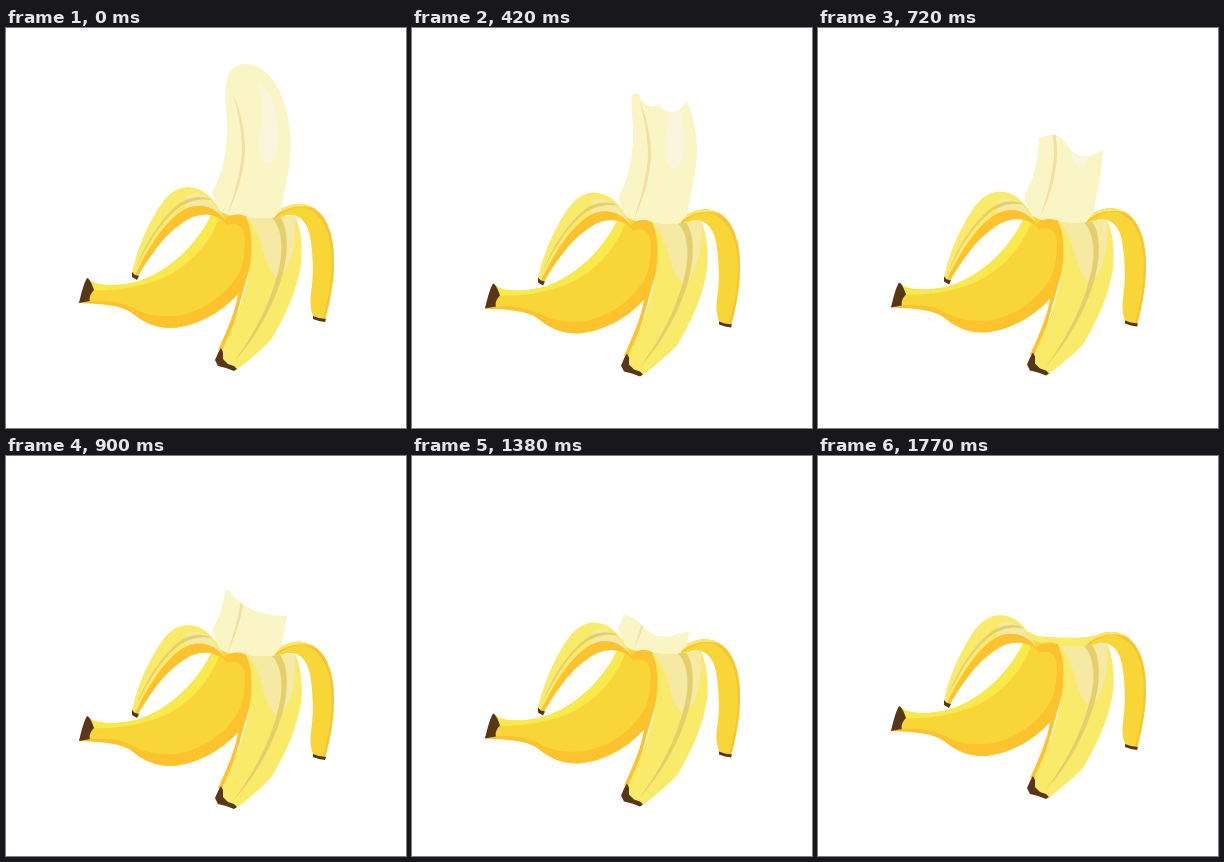
An HTML page for the animation above (1800 ms loop, 400 by 400 pixels).

```html
<!DOCTYPE html>
<html lang="en">
<head>
<meta charset="utf-8">
<title>Banana</title>
<style>
  html, body { margin: 0; width: 100%; height: 100%; overflow: hidden; background: #fff; }
  svg { display: block; width: 100vw; height: 100vh; }
  .main { fill: #f8d637; }
  .light { fill: #f9eb69; }
  .bright { fill: #f9e94a; }
  .pale { fill: #f5e9a3; }
  .deep { fill: #fdc32f; }
  .rib { fill: #e3cf6c; }
  .tip { fill: #593616; }
</style>
</head>
<body>
<svg viewBox="0 0 400 400">
  <defs>
    <clipPath id="left"><path id="bite" d=""/></clipPath>
  </defs>
  <g id="banana">
    <!-- inside of the skin, behind the fruit -->
    <path class="light" d="M198 165 C207 175 215 181 232 181 C248 182 264 183 284 178 L277 192 L222 196 L205 184Z"/>

    <g clip-path="url(#left)">
      <path fill="#faf5c5" d="M206 164 C216 148 221 125 221 99 C221 84 218 73 220 56 C222 42 229 36 239 36 C254 36 266 47 273 62 C281 80 285 100 285 118 C284 144 277 168 273 192 L222 196 L212 181Z"/>
      <path fill="#f4dfa2" d="M227 66 C235 84 239 104 239 121 C238 146 231 166 221 188 C229 164 235 143 236 122 C236 102 232 84 227 66Z"/>
      <path fill="#fbf5de" d="M252 57 C259 56 268 70 271 92 C274 112 271 132 264 135 C256 136 252 124 253 109 C256 93 258 75 252 57Z"/>
    </g>

    <!-- right flap -->
    <path class="main" d="M268 190 C276 179 285 175 296 176 C311 178 320 189 325 207 C331 232 327 263 319 292 L307 288 C304 280 304 273 305 265 C308 246 307 226 304 208 C301 194 294 187 284 187 C278 187 274 189 268 190Z"/>
    <path class="deep" d="M296 176 C311 178 320 189 325 207 C331 232 327 263 319 292 L317 291 C325 262 329 234 323 209 C318 192 309 181 296 179 C286 179 277 184 270 190 L268 190 C276 179 285 175 296 176Z"/>
    <path class="light" d="M270 187 C277 179 285 175 296 176 C300 176 304 178 307 180 C294 176 281 179 270 187Z"/>
    <path class="tip" d="M307 288 L313 290 L320 291 L319 294 L313 293 L307 291Z"/>

    <!-- unpeeled body -->
    <path class="main" d="M82 251 C89 258 109 259 130 254 C164 244 194 214 208 181 L222 187 L243 192 C247 219 244 250 232 266 C219 281 194 298 166 300 C149 300 137 294 126 285 C115 276 96 275 73 274Z"/>
    <path class="bright" d="M82 251 C89 258 109 259 130 254 C164 244 194 214 208 181 L214 187 C205 217 177 245 146 254 C124 261 103 263 84 262Z"/>
    <path class="deep" d="M73 274 C97 271 113 273 127 280 C143 289 163 290 180 286 C205 279 227 260 235 240 C240 225 239 209 238 196 L244 193 C247 220 243 250 232 266 C219 281 194 298 166 300 C149 300 137 294 126 285 C115 277 96 276 73 275Z"/>
    <path class="tip" d="M81 250 C84 251 86 256 88 262 C84 266 83 270 84 273 L73 275 C75 267 77 257 81 250Z"/>

    <!-- left flap -->
    <path class="light" d="M219 192 C210 174 200 159 181 159 C162 160 152 180 141 201 C133 218 128 233 126 245 L131 250 C141 231 157 207 175 195 C190 183 207 183 219 192Z"/>
    <path class="pale" d="M180 168 C188 163 197 167 204 172 C210 178 214 184 217 189 C206 177 192 176 179 181Z"/>
    <path class="rib" d="M129 242 C140 213 156 189 174 175 C185 168 197 167 206 172 C193 170 184 173 175 178 C156 191 141 217 129 242Z"/>
    <path class="deep" d="M219 192 C210 180 198 175 184 179 C164 186 145 214 129 247 L131 250 C142 231 157 208 175 196 C190 184 207 184 219 194Z"/>
    <path class="tip" d="M126 244 L129 247 L133 248 L131 252 L126 249Z"/>

    <!-- front flap -->
    <path class="deep" d="M218 193 C224 184 238 185 246 192 L250 218 L220 324 L212 322 C222 301 230 281 232 266 C236 247 239 230 239 213 C239 199 232 193 221 197Z"/>
    <path class="light" d="M240 189 C255 192 273 190 289 187 C295 200 297 220 295 236 C291 262 280 287 265 312 C253 324 241 334 230 342 L217 334 L216 322 C229 295 241 264 245 230 C246 214 246 202 240 189Z"/>
    <path class="pale" d="M240 189 C255 192 273 190 289 187 C291 210 287 237 273 251 C263 246 259 231 255 215 C251 203 247 195 240 189Z"/>
    <path class="rib" d="M266 190 C276 200 278 222 272 244 C264 278 245 311 227 335 C249 311 268 278 277 245 C283 221 282 200 274 189Z"/>
    <path class="tip" d="M215 320 L217 324 L217 331 L222 336 L228 338 L231 341 L228 343 L220 340 L212 338 L209 332 C211 328 212 324 215 320Z"/>
  </g>
</svg>
<script>
const LOOP = 1800, BOB = 600, BITE = 300;
const banana = document.getElementById("banana");
const bite = document.getElementById("bite");

// Upper edge of the fruit after each bite.
const edges = [
  "M190 20 L300 20",
  "M190 62 L221 61 Q224 59 227 60 Q229 69 236 72 Q242 74 247 71 Q250 77 256 78 Q266 79 270 74 L274 68 L300 110",
  "M190 105 L223 105 Q231 102 238 102.5 C246 105 249 114 256 120 C264 127 275 124 285 117 L300 117",
  "M190 124 L222 124 C235 141 252 150 280 150 L300 150",
  "M190 151 L213 151 Q223 154 229 161 Q238 169 246 173 Q251 171 257 174 Q265 169 276 168 L300 168",
  "M0 500 L300 500"
].map(edge => edge + " L300 600 L190 600Z");

function draw(time) {
  const t = time % LOOP;
  const dip = 5 * (1 - Math.cos(2 * Math.PI * (t / BOB + 0.03)));
  banana.setAttribute("transform", `translate(0 ${dip.toFixed(2)})`);
  bite.setAttribute("d", edges[Math.floor(t / BITE)]);
}

const start = performance.now();
function tick() {
  draw(performance.now() - start);
  requestAnimationFrame(tick);
}
tick();
</script>
</body>
</html>
```
